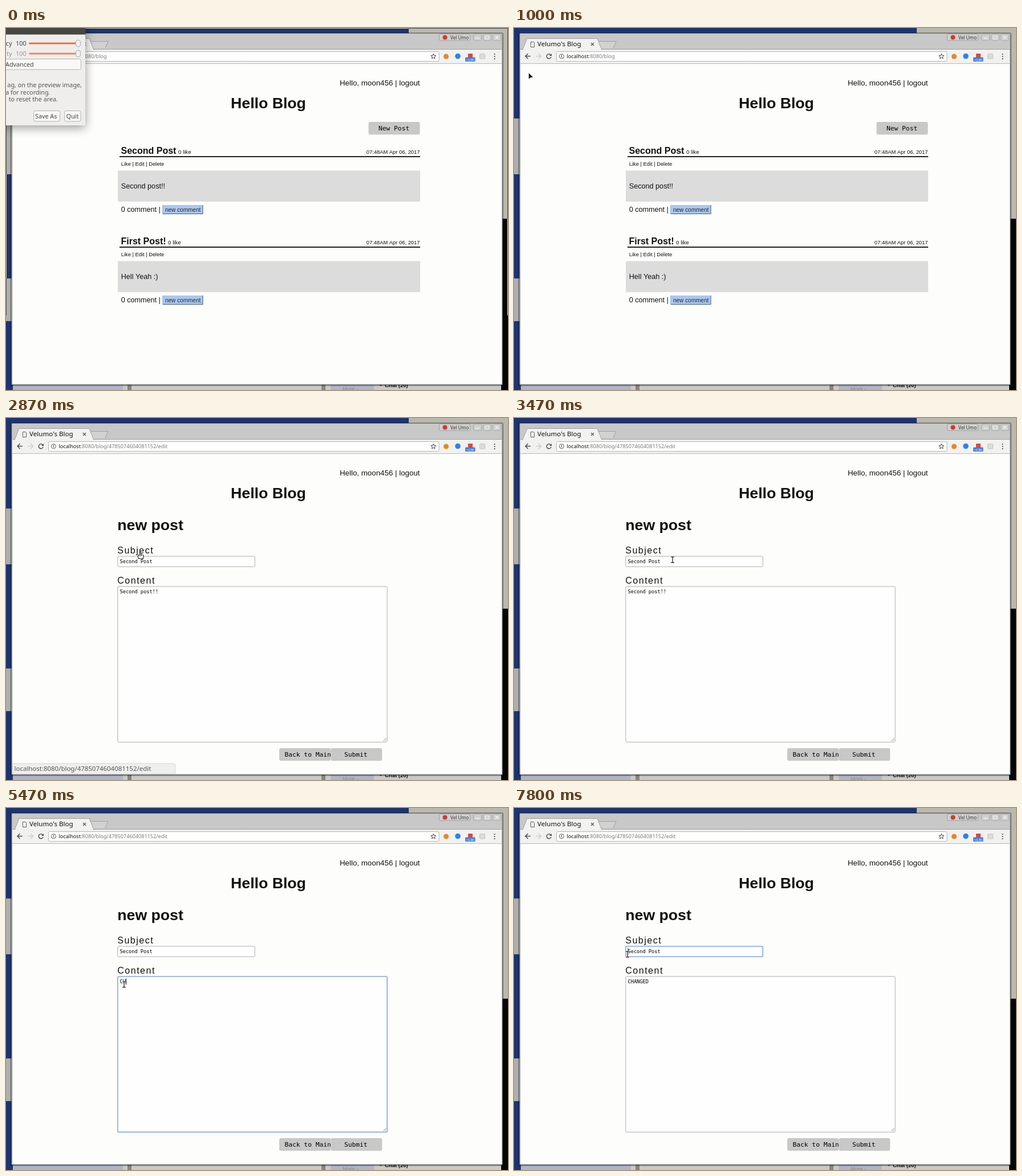
An HTML page with a canvas that plays this animation: 880x636 px, repeating every 8 s.

```html
<!DOCTYPE html>
<html lang="en">
<head>
<meta charset="utf-8">
<title>Blog editing</title>
<style>
html, body { margin: 0; width: 100%; height: 100%; overflow: hidden; }
canvas { display: block; }
</style>
</head>
<body>
<canvas id="stage" width="880" height="636"></canvas>
<script>
const ctx = document.getElementById('stage').getContext('2d');
const LOOP = 8000, STEP = 1000 / 15;
const SANS = '"Liberation Sans", Arial, sans-serif';
const UI = '"Noto Sans", sans-serif';
const MONO = '"DejaVu Sans Mono", monospace';
const INK = '#111';
const EDIT_PATH = ':8080/blog/4785074604081152/edit';
const OLD_TEXT = 'Second post!!', NEW_TEXT = 'CHANGED';
const CHAR = 5.2, FIELD_X = 199.5;
const EDIT_OPENS = 2720, CONTENT_FOCUS = 4400, TYPING = 5290, KEY_GAP = 152, SUBJECT_FOCUS = 7590;

function paint(fill, stroke, line) {
  if (fill) { ctx.fillStyle = fill; ctx.fill(); }
  if (stroke) { ctx.strokeStyle = stroke; ctx.lineWidth = line; ctx.stroke(); }
}
function box(x, y, w, h, fill, stroke, radius = 0, line = 1) {
  ctx.beginPath();
  ctx.roundRect(x, y, w, h, radius);
  paint(fill, stroke, line);
}
function shape(points, fill, stroke, line = 1) {
  ctx.beginPath();
  points.forEach(([x, y]) => ctx.lineTo(x, y));
  if (fill) ctx.closePath();
  paint(fill, stroke, line);
}
const path = (points, color, line) => shape(points, null, color, line);
const disc = (x, y, r, fill, stroke) => box(x - r, y - r, 2 * r, 2 * r, fill, stroke, r);

function cross(x, y, r, color) {
  for (const s of [-1, 1]) path([[x - r, y - r * s], [x + r, y + r * s]], color, 1.2);
}
function text(str, x, y, size, { font = SANS, color = INK, weight = 400, align = 'left', spacing = 0 } = {}) {
  ctx.font = `${weight} ${size}px ${font}`;
  ctx.letterSpacing = spacing + 'px';
  ctx.textAlign = align;
  ctx.fillStyle = color;
  ctx.fillText(str, x, y);
  return ctx.measureText(str).width;
}
const heading = (str, x, y, size, align) => text(str, x, y, size, { weight: 700, align });
const mono = (str, x, y, size, color = '#000') => text(str, x, y, size, { font: MONO, color });
const ui = (str, x, y, color = '#555', align = 'left', size = 10.8) =>
  text(str, x, y, size, { font: UI, color, align });

function drawDesktop() {
  box(0, 0, 880, 636, '#1d3470');
  for (const y of [159, 440]) box(-1, y, 11, y < 200 ? 98 : 75, '#b0afae');
  box(706, 0, 174, 335, '#bab7ad');
  box(866, 335, 14, 301, '#050609');
  // windows peeking out below the browser
  box(12, 620, 856, 16, '#c9c9c8');
  for (const x of [12, 569]) box(x, 620, x < 20 ? 193 : 76, 16, '#afb5c8');
  for (const x of [213, 553]) box(x, 620, 7, 16, '#858585');
  text('More -', 590, 637, 9.5, { color: '#888' });
  heading('Chat (20)', 664, 630.5, 9.5);
  disc(657, 627, 2, '#2a7a55');
}

function tab(x, top, w, bottom, slope, fill) {
  const points = [[x, bottom], [x + slope, top], [x + w - slope, top], [x + w, bottom]];
  shape(points, fill);
  path(points, '#a0a0a0');
}

function navArrow(tip, dir, color) {
  path([[tip, 49.5], [tip + 9 * dir, 49.5]], color, 1.4);
  path([[tip + 4.5 * dir, 45], [tip, 49.5], [tip + 4.5 * dir, 54]], color, 1.4);
}

function drawTitleBar() {
  tab(150, 23.5, 24, 35, -5, '#d2d2d2');
  path([[11, 37.5], [869, 37.5]], '#a0a0a0');
  tab(15, 18.5, 139, 38.5, 8, '#f2f2f1');
  box(29.5, 24.5, 6, 9, '#fff', '#555', [0, 2, 0, 0]);
  ui("Velumo's Blog", 41, 32, INK, 'left', 11.6);
  cross(137.5, 28.5, 2.5, '#555');

  box(759.5, 10.5, 54, 11.5, '#d0d0d0', '#a0a0a0', 2);
  disc(769.5, 16.5, 4, '#d23a30');
  ui('Vel Umo', 779, 20, '#333', 'left', 8.2);
  for (let i = 0; i < 3; i++) box(819.5 + 17 * i, 11, 14, 11, '#d0d0d0', '#a8a8a8', 2);
  path([[823, 18], [830, 18]], '#f4f4f4', 1.5);
  box(840.5, 14, 6, 5, null, '#f4f4f4');
  cross(860.5, 16.5, 2.5, '#f4f4f4');
}

function drawToolbar(editing) {
  navArrow(20, 1, '#444');
  navArrow(47.5, -1, '#ccc');
  ctx.beginPath();
  ctx.arc(61.3, 49.7, 4, .3, 5.4);
  paint(null, '#444', 1.4);
  shape([[66, 45], [66, 49], [62, 49]], '#444');

  box(74.5, 41.5, 684.5, 17, '#fefefe', '#b5b5b5', 2);
  disc(83.5, 49.7, 4, null, '#555');
  path([[83.5, 47], [83.5, 52]], '#555');
  const hostWidth = ui('localhost', 92.5, 53, INK, 'left', 9.1);
  ui(editing ? EDIT_PATH : ':8080/blog', 92.5 + hostWidth, 53, '#7c7c7c', 'left', 9.1);
  const star = Array.from({ length: 11 }, (_, i) => {
    const a = i * Math.PI / 5 - Math.PI / 2, r = i % 2 ? 2.1 : 4.8;
    return [749.3 + r * Math.cos(a), 50 + r * Math.sin(a)];
  });
  path(star, '#444');

  disc(771.5, 50, 4.6, '#e08a2c');
  disc(792, 49.5, 4.8, '#2d83e8');
  box(810, 45, 8, 7, '#d84a3e');
  box(805, 51.5, 17.5, 7.5, '#3d7ee8', null, 1);
  text('>13K', 813.8, 57.8, 6.2, { color: '#fff', align: 'center' });
  box(830.5, 45.5, 9, 8.5, '#dcdcdc', '#c2c2c2', 1);
  for (let i = -1; i <= 1; i++) disc(856.5, 50 + 4 * i, 1.1, '#444');
}

function drawWindow(editing) {
  box(8.5, 9, 862.5, 619, null, 'rgba(0,0,0,.35)', 2, 2);
  box(10, 9.5, 860, 617, '#c8c8c8', '#858585');
  box(11.5, 38, 857.5, 587.5, '#fdfdfb');
  box(11.5, 38, 857.5, 24, '#f1f1f0');
  path([[11, 62.5], [869, 62.5]], '#b9b9b9');
  drawTitleBar();
  drawToolbar(editing);
}

function button(label, x, y, labelX) {
  box(x, y, 90, 22.3, '#c8c8c8', null, 3);
  mono(label, labelX, y + 15, 11.25);
}

function drawPost(title, body, y) {
  const titleWidth = heading(title, 201.5, y, 16);
  text('0 like', 205 + titleWidth, y, 9.7);
  text('07:48AM Apr 06, 2017', 725.5, y - .5, 9.4, { align: 'right' });
  box(199, y + 4, 527, 2, '#222');
  text('Like | Edit | Delete', 201.7, y + 20.5, 9.35);
  box(196, y + 29.5, 530, 54.5, '#dcdcdc');
  text(body, 201.7, y + 60.5, 12.65);
  text('0 comment |', 201.7, y + 102, 12.6);
  box(274.5, y + 90, 71, 16, '#3f5a80');
  box(274.5, y + 90, 70, 15, '#a9c8f0');
  text('new comment', 279, y + 101.7, 10, { color: '#2b2b2b' });
}

function drawList() {
  button('New Post', 635.5, 165, 653);
  drawPost('Second Post', OLD_TEXT, 221);
  drawPost('First Post!', 'Hell Yeah :)', 380);
}

function field(label, y, w, h, focused) {
  text(label, 195.3, y - 5, 16, { spacing: 1.5 });
  box(195.8, y, w, h, '#fefefe', focused ? '#82a8ea' : '#adadad', 2, focused ? 1.6 : 1);
}
const caretBar = (index, y) => box(FIELD_X + index * CHAR, y, 1, 11, '#000');

function drawContent(t, mouse) {
  const typed = Math.max(0, Math.floor((t - TYPING) / KEY_GAP) + 1);
  const value = typed ? NEW_TEXT.slice(0, typed) : OLD_TEXT;
  mono(value, FIELD_X, 308.3, 8.65);
  if (t < CONTENT_FOCUS || t > 6860) return;
  const underMouse = Math.round((mouse.x - FIELD_X) / CHAR);
  const caret = typed ? value.length : Math.max(0, Math.min(value.length, underMouse));
  if (caret < value.length) {
    const x = FIELD_X + caret * CHAR;
    box(x, 299.5, (value.length - caret) * CHAR, 11, '#3390ff');
    mono(value.slice(caret), x, 308.3, 8.65, '#fff');
  }
  caretBar(caret, 299.5);
}

function drawForm(t, mouse) {
  const inSubject = t >= SUBJECT_FOCUS, inContent = t >= CONTENT_FOCUS && !inSubject;
  heading('new post', 195.3, 197, 26.67);
  field('Subject', 243, 240.4, 18.2, inSubject);
  mono('Second Post', FIELD_X, 255.3, 8.65);
  if (inSubject) caretBar(0, 246.5);
  field('Content', 296, 472.4, 273.4, inContent);
  for (const d of [2, 5]) path([[666.5 - d, 567.5], [666.5, 567.5 - d]], '#888');
  drawContent(t, mouse);
  button('Back to Main', 479, 580, 488.5);
  button('Submit', 569.3, 580, 593);
}

// the pointer reaches each [time, x, y] and rests until it must leave for the next
const STOPS = [
  [900, 2, 60], [1400, 228, 236], [1667, 235, 236], [3400, 278, 249], [3600, 280, 254],
  [4400, 269, 308], [5000, 195, 309], [5333, 207, 310], [7530, 199, 257]
];
function mouseAt(t) {
  const next = STOPS.findIndex(stop => stop[0] > t);
  if (next < 1) {
    const [, x, y] = next ? STOPS.at(-1) : STOPS[0];
    return { x, y };
  }
  const [t0, x0, y0] = STOPS[next - 1], [t1, x1, y1] = STOPS[next];
  const glide = Math.min(t1 - t0, 500, 60 + 5 * Math.hypot(x1 - x0, y1 - y0));
  const p = Math.max(0, 1 - (t1 - t) / glide), ease = p * p * (3 - 2 * p);
  return { x: x0 + (x1 - x0) * ease, y: y0 + (y1 - y0) * ease };
}

function drawArrow() {
  shape([[0, 0], [0, 12], [3.5, 9], [8.5, 8.5]], '#111', '#fff', .8);
}
function drawHand() {
  box(-3.5, 4.5, 9.5, 6.5, '#fff', '#111', 2, 1.1);
  box(-1, 0, 2.4, 7, '#fff', '#111', 1, 1.1);
  box(-.5, 5, 1.5, 3, '#fff');
}
function drawIBeam() {
  for (const [color, line] of [['#fff', 3], ['#222', 1.3]]) {
    for (const y of [-5, 5]) path([[-3, y], [3, y]], color, line);
    path([[0, -5], [0, 5]], color, line);
  }
}
function drawMouse(t, { x, y }) {
  if (t < STOPS[0][0]) return;
  ctx.save();
  ctx.translate(x, y);
  (t < 1330 ? drawArrow : t < 3150 ? drawHand : drawIBeam)();
  ctx.restore();
}

function drawStatus() {
  box(11.5, 607, 285, 18.5, '#efefed', '#d5d5d3', [0, 3, 0, 0]);
  ui('localhost' + EDIT_PATH, 14.5, 619.8, '#555', 'left', 11.46);
}

function drawRecorder() {
  // inverted outline of the captured area
  ctx.save();
  ctx.globalCompositeOperation = 'difference';
  path([[.5, 505], [.5, .5], [879.5, .5], [879.5, 505]], '#fff');
  ctx.restore();

  ctx.save();
  ctx.shadowColor = 'rgba(0,0,0,.4)';
  ctx.shadowBlur = 16;
  ctx.shadowOffsetY = 4;
  box(-10, -10, 149, 181, '#efeeec');
  ctx.restore();
  box(0, 0, 139.5, 11.5, '#474642');
  ['cy', 'ty'].forEach((label, i) => {
    const y = 27 + 18 * i, color = i ? '#999' : '#444';
    ui(label, 10.5, y + 4, color, 'right', 11);
    ui('100', 17, y + 4, color, 'left', 11);
    box(40, y - 1.5, 84, 3, i ? '#ec8a5c' : '#e9703a', null, 1.5);
    box(122.5, y - 6, 8, 12, '#f2f1ef', '#aaa', 4);
  });
  const control = (label, x, y, w, labelX) => {
    box(x, y, w, 18.5, '#f8f8f7', '#b5b3b0', 3);
    ui(label, labelX, y + 13.3, '#444');
  };
  control('Advanced', -5, 54.5, 136.5, -1);
  control('Save As', 48.5, 145.5, 46, 51);
  control('Quit', 102.5, 145.5, 28.5, 105.5);
  ui('ag, on the preview image,', 133, 104, '#555', 'right');
  ui('a for recording.', 77.5, 116.7, '#555', 'right');
  ui('to reset the area.', 91, 129.2, '#555', 'right');
}

function draw(t) {
  const editing = t >= EDIT_OPENS, mouse = mouseAt(t);
  drawDesktop();
  drawWindow(editing);
  text('Hello, moon456 | logout', 725.5, 101, 13.33, { align: 'right' });
  heading('Hello Blog', 460, 141, 26.67, 'center');
  if (editing) drawForm(t, mouse); else drawList();
  if (t >= 1330 && t < 3150) drawStatus();
  drawMouse(t, mouse);
  if (t < 130) drawRecorder();
}

function tick() {
  const t = performance.now() % LOOP;
  draw(Math.floor((t + 4) / STEP) * STEP % LOOP);
  requestAnimationFrame(tick);
}
tick();
</script>
</body>
</html>
```
